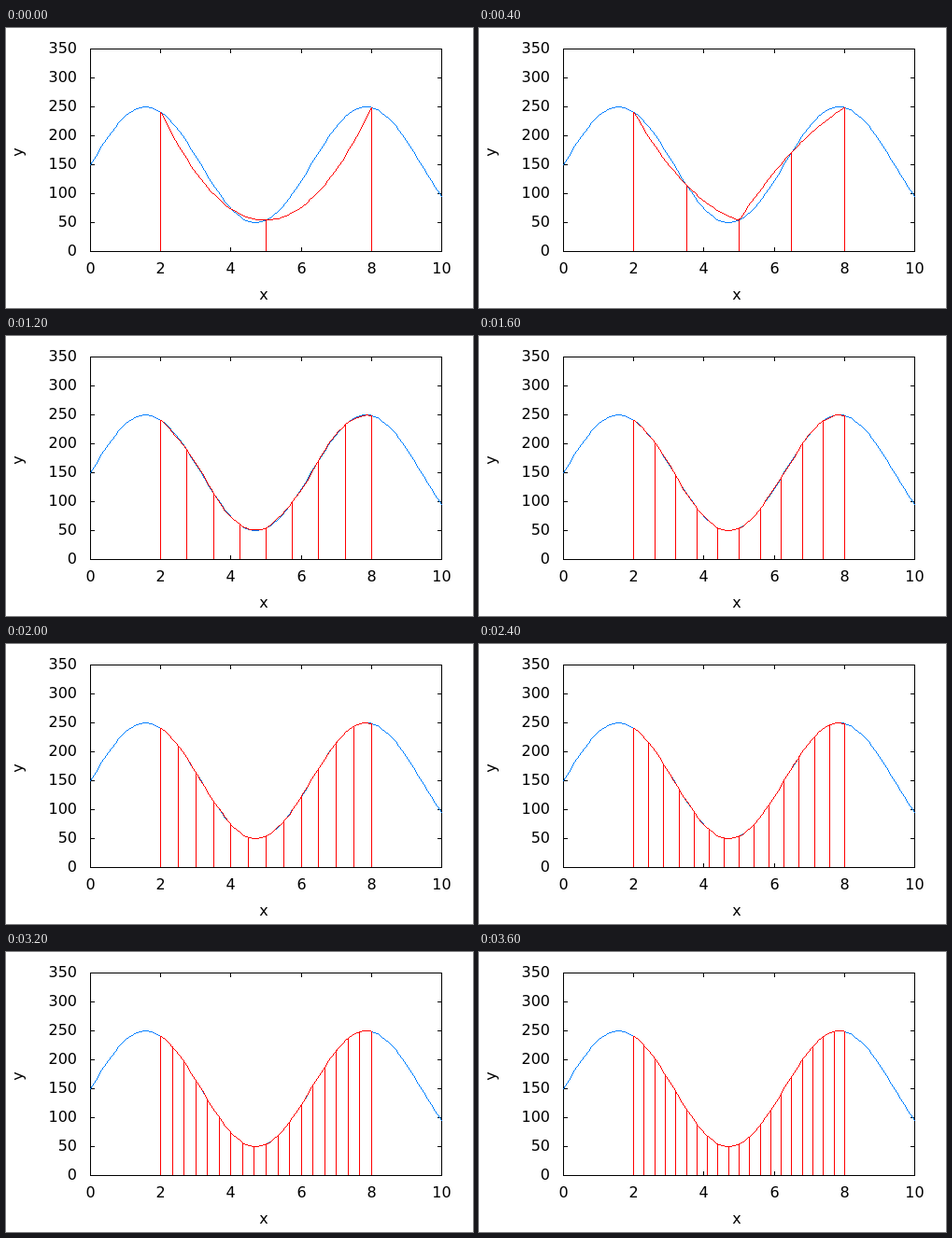
Write an HTML page with a canvas that moves like this. It is 500 px wide and 300 px high and loops after 4000 ms.

```html
<!DOCTYPE html>
<html lang="en">
<head>
<meta charset="utf-8">
<title>Simpson's rule</title>
<style>
  html, body { margin: 0; width: 100%; height: 100%; overflow: hidden; background: #fff; }
  canvas, svg { position: absolute; left: 0; top: 0; }
  text { font: 16px "DejaVu Sans", sans-serif; text-anchor: middle; }
  .y { text-anchor: end; }
</style>
</head>
<body>
<canvas width="500" height="300"></canvas>
<svg width="500" height="300">
  <text x="276" y="291">x</text>
  <text transform="translate(18 133) rotate(-90)">y</text>
</svg>
<script>
const ctx = document.querySelector('canvas').getContext('2d');
const svg = document.querySelector('svg');
const LEFT = 90, RIGHT = 466, TOP = 22, BOTTOM = 239;
const START = 2, END = 8, STEP_MS = 400, STEPS = 10, SAMPLES = 100;

const px = x => Math.round(LEFT + x * (RIGHT - LEFT) / 10);
const py = y => BOTTOM - Math.round(y * (BOTTOM - TOP) / 350);
const f = x => 150 + 100 * Math.sin(x);

// Hard-edged line, one pixel wide, both ends included
function line(x0, y0, x1, y1) {
  const dx = x1 - x0, dy = y1 - y0;
  const n = Math.max(Math.abs(dx), Math.abs(dy));
  for (let i = 0; i <= n; i++) {
    const t = n ? i / n : 0;
    ctx.fillRect(Math.round(x0 + dx * t), Math.round(y0 + dy * t), 1, 1);
  }
}

function plot(fn, from, to) {
  let last;
  for (let i = 0; i < SAMPLES; i++) {
    const x = i * 10 / (SAMPLES - 1);
    if (x < from || x > to) continue;
    const point = [px(x), py(fn(x))];
    if (last) line(...last, ...point);
    last = point;
  }
}

// Parabola through the ends and the middle of the panel holding x
function simpson(x, panels) {
  const w = (END - START) / panels;
  const a = START + w * Math.min(panels - 1, Math.floor((x - START) / w));
  const u = (x - a) / w;
  return f(a) * (2 * u - 1) * (u - 1) + f(a + w / 2) * 4 * u * (1 - u) + f(a + w) * u * (2 * u - 1);
}

function axes() {
  ctx.fillStyle = '#000';
  for (const y of [TOP, BOTTOM]) line(LEFT, y, RIGHT, y);
  for (const x of [LEFT, RIGHT]) line(x, TOP, x, BOTTOM);
  for (let v = 0; v <= 10; v += 2) {
    line(px(v), TOP, px(v), TOP + 4);
    line(px(v), BOTTOM, px(v), BOTTOM - 4);
  }
  for (let v = 0; v <= 350; v += 50) {
    line(LEFT, py(v), LEFT + 4, py(v));
    line(RIGHT, py(v), RIGHT - 4, py(v));
  }
}

function label(text, x, y, cls = '') {
  const el = document.createElementNS(svg.namespaceURI, 'text');
  el.setAttribute('x', x);
  el.setAttribute('y', y);
  el.setAttribute('class', cls);
  el.textContent = text;
  svg.append(el);
}

function draw(panels) {
  ctx.fillStyle = '#fff';
  ctx.fillRect(0, 0, 500, 300);
  axes();
  ctx.fillStyle = '#0080ff';
  plot(f, 0, 10);
  ctx.fillStyle = '#f00';
  plot(x => simpson(x, panels), START, END);
  for (let i = 0; i <= 2 * panels; i++) {
    const x = START + (END - START) * i / (2 * panels);
    line(px(x), py(f(x)), px(x), BOTTOM - 1);
  }
}

for (let v = 0; v <= 10; v += 2) label(v, px(v) + 0.5, 263);
for (let v = 0; v <= 350; v += 50) label(v, 76, py(v) + 5, 'y');

let shown = 0;
function tick() {
  const panels = Math.floor(performance.now() / STEP_MS) % STEPS + 1;
  if (panels !== shown) draw(shown = panels);
  requestAnimationFrame(tick);
}
tick();
</script>
</body>
</html>
```
